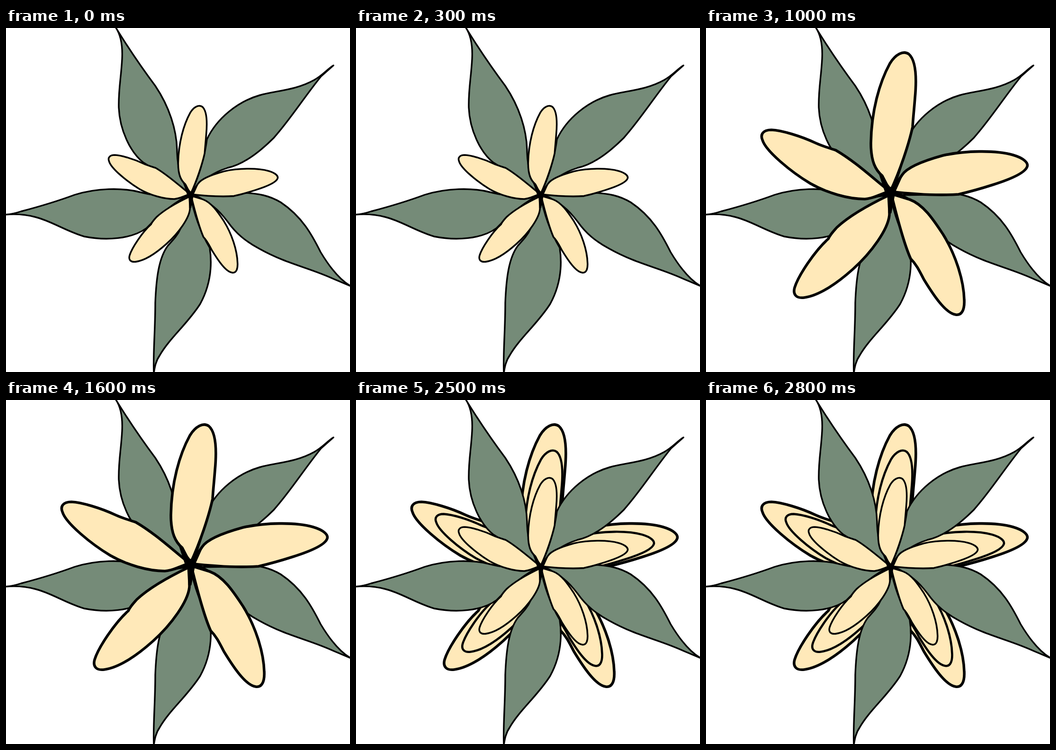
Animation, 726 px wide and 726 px high, one loop 3 s. Source, as an HTML page:

```html
<!DOCTYPE html>
<html lang="en">
<head>
<meta charset="utf-8">
<title>Flower</title>
<style>
  html, body { margin: 0; width: 100%; height: 100%; overflow: hidden; background: #fff; }
  svg { display: block; width: 100%; height: 100%; }
  path { stroke: #000; stroke-linejoin: round; stroke-linecap: round; }
  #leaves path { fill: #758b78; stroke-width: 3.4; }
  #petals path { fill: #ffe9b9; stroke-width: 5.6; }
  #petals .core { fill: #000; stroke-width: 3; }
</style>
</head>
<body>
<svg viewBox="0 0 726 726">
  <defs>
    <g id="petals">
      <path d="M389 345L372 312C358 300 348 282 348 243C349 175 366 115 388 75C400 55 417 47 428 55C443 68 445 105 441 148C439 175 437 190 436 209C428 245 410 300 389 345Z"/>
      <path d="M389 345L414 310C425 293 460 280 500 269C545 259 610 257 648 268C672 275 680 285 678 292C674 306 640 320 605 331C580 339 555 346 533 351C490 354 440 351 389 345Z"/>
      <path d="M391 350L430 362C460 373 482 408 500 435C525 475 544 530 545 574C546 596 539 607 527 605C505 602 479 562 460 531C452 516 445 500 432 487C418 456 402 395 391 350Z"/>
      <path d="M388 352L387 395C384 425 350 473 310 509C280 536 240 565 207 569C190 571 183 562 187 548C195 522 230 470 258 445C262 436 268 430 276 421C305 394 350 370 388 352Z"/>
      <path d="M389 346C350 315 315 282 274 258C262 254 245 249 232 243C200 228 160 216 138 215C121 215 114 224 119 236C126 260 180 304 220 328C255 348 300 361 335 361C350 360 360 355 389 346Z"/>
      <path class="core" d="M367 310L388 337L392 337L413 313L399 344L426 359L397 353L390 390L386 390L384 353L348 358L379 346Z"/>
    </g>
    <g id="leaves">
      <path d="M231 -2C245 18 246 45 245 65C243 105 237 130 238 168C240 215 262 262 290 284C325 305 360 335 389 351C370 325 362 295 361 262C361 215 344 165 315 122C285 82 258 42 231 -2Z"/>
      <path d="M691 79C678 87 667 101 650 110C610 132 570 132 535 142C490 155 445 190 424 235C419 275 405 320 389 351C415 318 440 304 468 295C500 288 535 262 565 232C600 193 630 145 665 102L691 79Z"/>
      <path d="M728 545C705 532 685 508 664 473C646 437 625 398 580 368C555 353 530 349 505 348C470 352 425 354 389 351C430 365 450 385 468 409C485 433 505 450 535 466C590 497 640 506 690 529L728 545Z"/>
      <path d="M312 728C310 690 315 640 315 580C317 530 322 485 342 459C352 448 362 438 368 424C380 400 387 380 389 351C397 395 410 430 430 464C436 505 430 545 410 582C385 622 345 655 325 690C316 703 314 715 312 728Z"/>
      <path d="M-3 394C10 393 20 391 32 387C70 377 110 365 145 352C190 338 245 336 285 347C320 356 355 356 389 351C350 370 318 400 297 422C265 446 210 449 165 440C125 428 95 407 62 399C40 393 20 392 -3 394Z"/>
    </g>
    <use id="large" href="#petals"/>
    <use id="medium" href="#petals" transform="translate(71.5 63.9) scale(.8218)"/>
    <use id="small" href="#petals" transform="translate(141.8 131.2) scale(.6365)"/>
  </defs>
  <g id="stage"></g>
</svg>
<script>
  const LOOP = 3000;
  // start time, then layers from back to front
  const steps = [
    [0, 'leaves small'],
    [500, 'leaves medium'],
    [1000, 'leaves large'],
    [2000, 'large leaves medium'],
    [2500, 'large medium leaves small']
  ];
  const stage = document.getElementById('stage');
  const layers = names => names.split(' ').map(id => `<use href="#${id}"/>`).join('');
  let shown = null;

  function draw(now) {
    const t = now % LOOP;
    const names = steps.filter(s => s[0] <= t).pop()[1];
    if (names !== shown) {
      stage.innerHTML = layers(names);
      shown = names;
    }
  }

  function tick() {
    draw(performance.now());
    requestAnimationFrame(tick);
  }
  tick();
</script>
</body>
</html>
```
